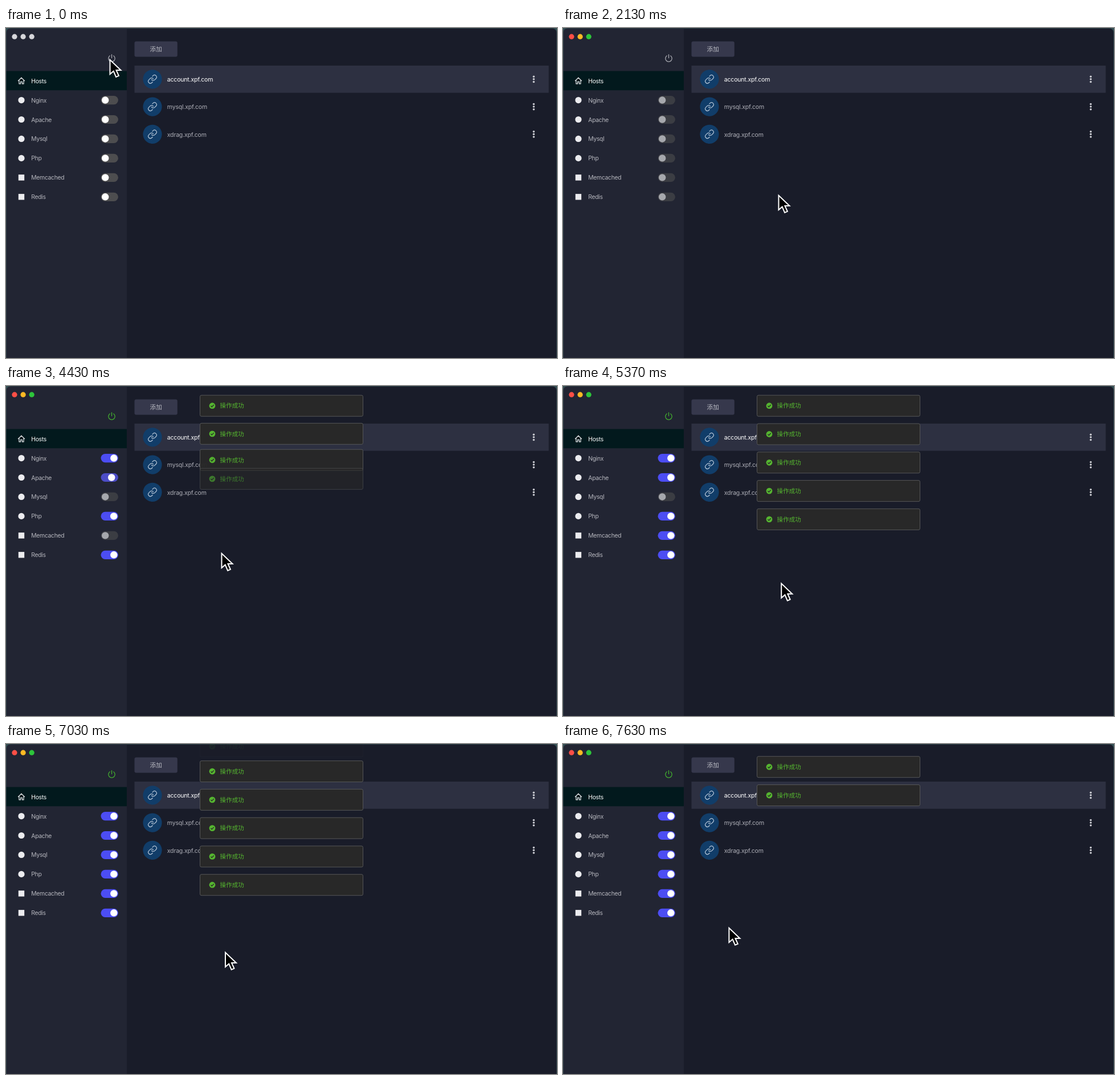
An HTML page for the animation above (7.66 s loop, 967x579 px).

```html
<!DOCTYPE html>
<html lang="zh-CN">
<head>
<meta charset="utf-8">
<style>
  html, body { margin: 0; width: 100%; height: 100%; overflow: hidden; background: #345054; }
  svg { display: block; }
  text { font: 10.56px Inter, "Noto Sans CJK SC", "Noto Sans CJK", sans-serif; letter-spacing: -.2px; }
  .menu { font-size: 10.4px; letter-spacing: -.32px; }
  .cjk { letter-spacing: 0; }
</style>
</head>
<body>
<svg id="stage" width="967" height="579" viewBox="0 0 967 579">
  <defs>
    <clipPath id="win"><rect x=".8" y=".8" width="965.4" height="590" rx="7"/></clipPath>
    <g id="link" fill="none" stroke="#b4c4d6" stroke-width="1.7" stroke-linecap="round" transform="scale(.73) translate(-12 -12)">
      <path d="M10 13a5 5 0 0 0 7.54.54l3-3a5 5 0 0 0-7.07-7.07l-1.72 1.71"/>
      <path d="M14 11a5 5 0 0 0-7.54-.54l-3 3a5 5 0 0 0 7.07 7.07l1.71-1.71"/>
    </g>
  </defs>
  <g clip-path="url(#win)">
    <path fill="#191c29" d="M0 0H967V579H0z"/>
    <path fill="#222533" d="M0 0H212V579H0z"/>
    <path fill="#02191d" d="M0 75.5H212V109.3H0z"/>
  </g>
  <g id="lights"></g>
  <g id="power" fill="none" stroke-width="1.3" stroke-linecap="round">
    <path d="M182.2 48.8a5.7 5.7 0 1 0 6.6 0M185.5 46.6v6"/>
  </g>
  <path fill="none" stroke="#f0f0f2" stroke-width="1.2" stroke-linejoin="round" stroke-linecap="round"
        d="M21.4 92.6L27 87.2l5.6 5.4M23 91.6v6.3h2.6v-3.6h2.8v3.6H31v-6.3"/>
  <g id="menu"></g>
  <rect x="225.5" y="23.5" width="75.3" height="27" rx="3" fill="#36384c"/>
  <text class="cjk" x="252.6" y="41" fill="#b9bac2">添加</text>
  <rect x="225.5" y="66" width="727" height="47.7" fill="#2d3041"/>
  <g id="rows"></g>
  <g id="toasts"></g>
  <path id="cursor" fill="#000" stroke="#fff" stroke-width="2"
        d="M1 2.4V27.6L7.2 22.2L11.6 32.4L16.4 30.3L12 20.6H20z"/>
</svg>
<script>
const LOOP = 7660;
const $ = id => document.getElementById(id);
const mix = (a, b, p) => a + (b - a) * p;
const clamp = x => Math.min(1, Math.max(0, x));

// The CSS "ease" curve, cubic-bezier(.25, .1, .25, 1)
function ease(x) {
  if (x <= 0) return 0;
  if (x >= 1) return 1;
  let lo = 0, hi = 1, s;
  for (let i = 0; i < 20; i++) {
    s = (lo + hi) / 2;
    if (.75 * s * (1 - s) + s ** 3 < x) lo = s; else hi = s;
  }
  return .3 * s * (1 - s) ** 2 + 3 * s * s * (1 - s) + s ** 3;
}
const since = (t, start, length) => ease((t - start) / length);

function add(parent, markup) {
  const g = document.createElementNS("http://www.w3.org/2000/svg", "g");
  g.innerHTML = markup;
  $(parent).append(g);
  return g;
}

const FOCUS = 420, BUSY = 880;
const services = [
  ["Nginx", 4075], ["Apache", 4300], ["Mysql", 5680],
  ["Php", 4170], ["Memcached", 4825], ["Redis", 3775]
];
const powerOn = 3775;

const lights = ["#fe4f46", "#fdb924", "#2dc53b"].map((color, i) => {
  const g = add("lights", `<circle cx="${15 + 15.1 * i}" cy="15.2" r="4.6"/>`);
  return { g, color };
});

const menuY = i => 92.6 + 33.95 * i;
add("menu", `<text class="menu" x="44.3" y="96.6" fill="#fff">Hosts</text>`);
const switches = services.map(([name, on], i) => {
  const y = menuY(i + 1);
  const icon = i > 3
    ? `<rect x="21.8" y="${y - 5.2}" width="10.4" height="10.4" fill="#ececef"/>`
    : `<circle cx="27" cy="${y}" r="5.6" fill="#ececef"/>`;
  add("menu", `${icon}<text class="menu" x="44.3" y="${y + 4}" fill="#b5b6bd">${name}</text>`);
  const g = add("menu", `<rect x="166.5" y="${y - 7.6}" width="30.4" height="15.2" rx="7.6"/>
    <circle cy="${y}" r="6.2" fill="#fff"/>`);
  return { g, on, track: g.children[0], knob: g.children[1] };
});

["account", "mysql", "xdrag"].forEach((host, i) => {
  const y = 89.8 + 48.25 * i;
  const dots = [-4.6, 0, 4.6].map(d => `<circle cx="926.2" cy="${y + d}" r="1.75" fill="#cfd0d6"/>`).join("");
  add("rows", `<circle cx="257" cy="${y}" r="16.6" fill="#113d69"/>
    <use href="#link" x="0" y="0" transform="translate(257 ${y})"/>
    <text x="282.8" y="${y + 4.3}" fill="${i ? "#adaeb6" : "#fff"}">${host}.xpf.com</text>${dots}`);
});

// Toasts slide in one below another; each one that closes lets the rest move up.
const GAP = 49.8, HEIGHT = 38, LAG = 26;
const opens = [3800, 4100, 4194, 4325, 4850, 5700];
const closes = [6830, 7103, 7196, 7330];
const toasts = opens.map((open, i) => ({
  open, i, close: closes[i] ?? Infinity,
  g: add("toasts", `<rect x="340.5" y=".5" width="286" height="37" rx="2.5" fill="#282828" stroke="#555657"/>
    <circle cx="362" cy="19" r="5.4" fill="#55b530"/>
    <path d="M359.4 19.1l1.9 1.9 3.4-3.7" fill="none" stroke="#282828" stroke-width="1.3"/>
    <text class="cjk" x="375.6" y="22.8" fill="#55b530">操作成功</text>`)
}));

function toastTop(t, i) {
  let from = 15.7 + GAP * i, to = from, start = 0;
  for (const close of closes.slice(0, i)) {
    const at = close + LAG;
    if (t < at) break;
    from = mix(from, to, since(at, start, 400));
    to -= GAP;
    start = at;
  }
  return mix(from, to, since(t, start, 400));
}

// Cursor moves: start, end, x, y
const moves = [[1300, 1900, 377.5, 291.5], [5120, 5500, 384, 363.5], [7330, 7700, 281, 316]];
function cursorAt(t) {
  let x = 181.5, y = 53.5;
  for (const [start, end, toX, toY] of moves) {
    const p = clamp((t - start) / (end - start)), s = p * p * (3 - 2 * p);
    x = mix(x, toX, s);
    y = mix(y, toY, s);
  }
  return [x, y];
}

function draw(t) {
  for (const { g, color } of lights) g.setAttribute("fill", t < FOCUS ? "#d6d6da" : color);
  $("power").setAttribute("stroke", t < powerOn ? "#a9aab1" : "#43b02f");

  for (const { g, on, track, knob } of switches) {
    const p = since(t, on, 300);
    g.setAttribute("opacity", t >= BUSY && t < on ? .6 : 1);
    track.setAttribute("fill", `rgb(${mix(77, 76, p)},${mix(77, 77, p)},${mix(79, 243, p)})`);
    knob.setAttribute("cx", mix(174.2, 189.3, p));
  }

  for (const { g, i, open, close } of toasts) {
    const slide = 1 - since(t, open, 400) + since(t, close, 400);
    g.setAttribute("opacity", since(t, open, 300) - since(t, close, 300));
    g.setAttribute("transform", `translate(0 ${toastTop(t, i) - HEIGHT * slide})`);
  }

  $("cursor").setAttribute("transform", `translate(${cursorAt(t)})`);
}

const begin = performance.now();
function tick() {
  draw((performance.now() - begin) % LOOP);
  requestAnimationFrame(tick);
}
tick();
</script>
</body>
</html>
```
